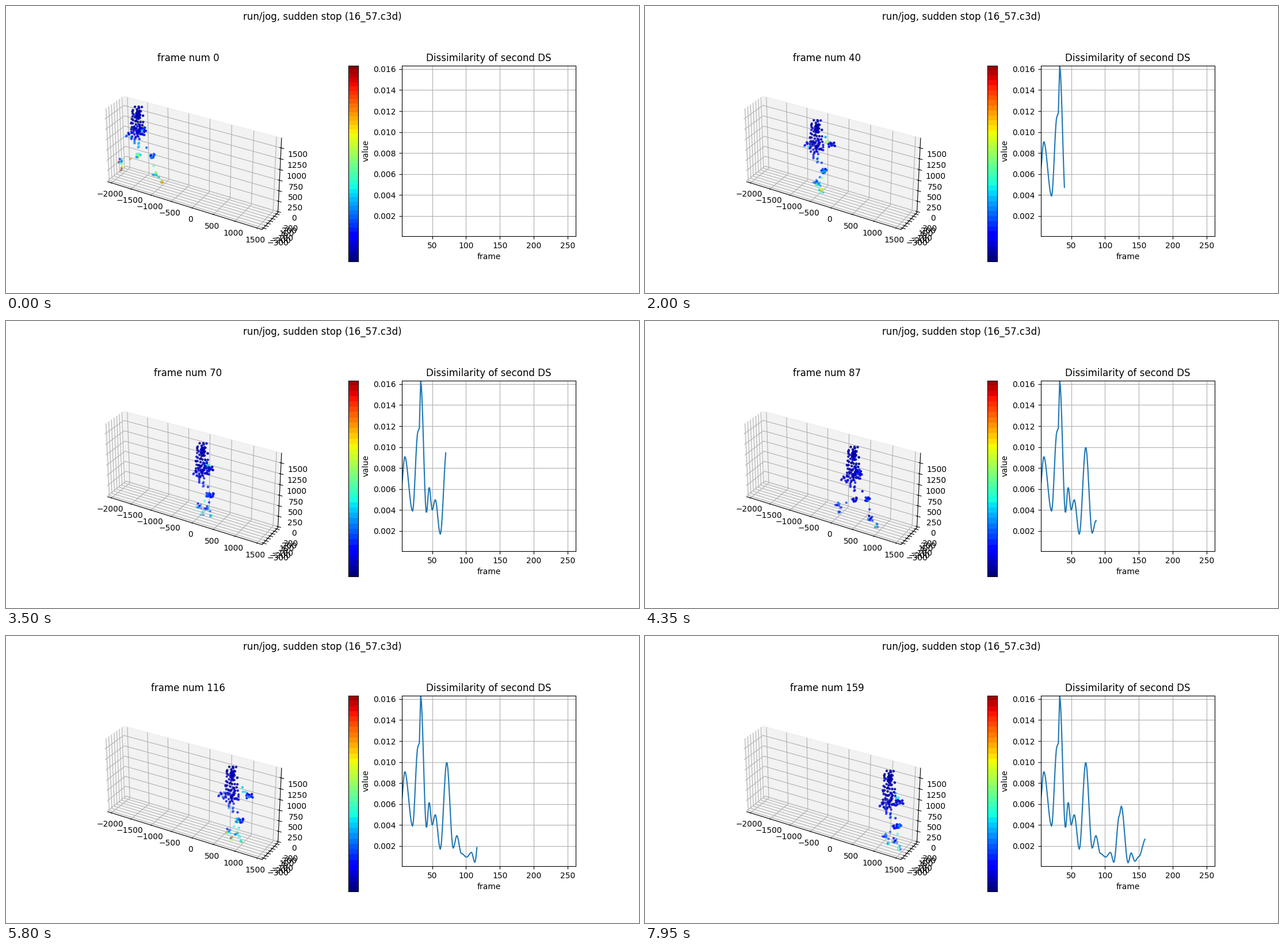
Write a matplotlib script that moves like this. It is 1100 px wide and 500 px high and loops after 8000 ms.

```python
import numpy as np
import matplotlib.pyplot as plt
from matplotlib.animation import FuncAnimation

W, H, DPI = 1100, 500, 100
FRAMES, INTERVAL = 160, 50
STRIDE = 58
JET = plt.get_cmap("jet")
rng = np.random.default_rng(16)

# Marker count, spread in pixels (x, y) and colour level of each body part.
PARTS = {
    "top": (1, 0, 0, 0), "head": (27, 4.5, 6.5, 0), "chest": (24, 6.5, 7, 0),
    "belly": (14, 6.5, 6, 0), "hips": (24, 7, 5, .02), "thigh": (8, 3.5, 5, .15),
    "elbow": (3, 4, 3, .3), "hand_r": (11, 4, 3, .1), "hand_l": (10, 4, 4, .1),
    "knee_r": (11, 2.5, 3.5, .35), "knee_l": (11, 2.5, 3.5, .15),
    "shin_r": (1, 0, 0, .5), "shin_l": (1, 0, 0, .2), "upper_leg": (1, 0, 0, .08),
    "ankle_r": (9, 3.5, 3, .25), "ankle_l": (9, 3.5, 3, .3),
    "toe_r": (5, 3, 2, .6), "toe_l": (5, 3, 2, .6),
}

# Turning points of the dissimilarity curve, values in 1e-4.
TURNS = [(4, 60), (9.5, 91), (21, 39), (29, 115), (31, 118), (33, 163), (41.5, 37), (45.5, 62),
         (50, 40), (54.5, 50), (62, 17), (71.5, 100), (81, 18), (86.5, 30), (93, 13), (101, 9.5),
         (108, 14), (113, 4.5), (121, 49), (124, 58), (134, 4), (138.5, 13.5), (144, 5.5),
         (150, 10), (160, 27)]


def smooth(s):
    s = np.clip(s, 0, 1)
    return s * s * (3 - 2 * s)


def eased(t, points):
    """Smooth steps from each turning point to the next."""
    x, y = np.array(points, float).T
    i = np.clip(np.searchsorted(x, t, side="right") - 1, 0, len(x) - 2)
    return y[i] + (y[i + 1] - y[i]) * smooth((t - x[i]) / (x[i + 1] - x[i]))


def mix(a, b, s):
    return a * (1 - s) + b * s


def pose(t):
    """Screen position of every body part: a run that slows down to a stop."""
    hips = np.array([229 + 1.9 * t - .0042 * t**2, 222 + .73 * t - .0018 * t**2])
    head = hips + (-2, -36 - .07 * t)
    p = {"hips": hips, "head": head, "top": head + (9, -10), "thigh": hips + (0, 17),
         "chest": mix(head, hips, .45), "belly": mix(head, hips, .75)}

    stop = smooth((t - 95) / 30)
    arm = 2 * np.pi * t / 84
    p["hand_r"] = hips + (17 - 9 * np.cos(arm) + 8 * stop, -8 + 4 * stop)
    p["hand_l"] = hips + (-14 - 5 * np.sin(arm), -2 + 5 * np.cos(arm))
    p["elbow"] = mix(p["chest"], p["hand_r"], .65) - (0, 4)

    reach = 18 + 11 * np.cos(2 * np.pi * t / 87)
    swing = reach * np.cos(2 * np.pi * t / STRIDE) - 8 * stop
    for side, s in (("r", -swing), ("l", swing)):
        knee = hips + (13 + .4 * s, 40)
        ankle = hips + (2 + s, 61 + .4 * s)
        p["knee_" + side], p["ankle_" + side] = knee, ankle
        p["shin_" + side] = mix(knee, ankle, .5)
        p["toe_" + side] = ankle + (7 + .15 * s, 12)
    lead = max(p["knee_r"], p["knee_l"], key=lambda k: k[0])
    p["upper_leg"] = mix(hips, lead, .62)
    return p


NAMES = [name for name, part in PARTS.items() for _ in range(part[0])]
TRAITS = np.array([PARTS[name][1:] for name in NAMES])
COUNT = len(NAMES)
OFFSET = np.clip(rng.normal(size=(COUNT, 2)), -1.6, 1.6) * TRAITS[:, :2]
DEPTH = rng.normal(0, 9, COUNT)
GAIN = np.exp(rng.normal(0, .4, COUNT))
PHASE = rng.uniform(0, 2 * np.pi, COUNT)


def markers(t):
    """Positions and colours of all markers, far ones first and fainter."""
    p = pose(t)
    xy = np.array([p[name] for name in NAMES]) + OFFSET
    fade = 1 - (t % 90) / 100
    flicker = np.exp(.3 * np.sin(PHASE + .2 * t))
    heat = np.clip((.04 + TRAITS[:, 2] * (.2 + fade)) * GAIN * flicker, 0, 1)
    near = .58 * xy[:, 0] - .5 * xy[:, 1] + DEPTH
    rgba = JET(heat)
    rgba[:, 3] = .3 + .7 * (near - near.min()) / np.ptp(near)
    order = np.argsort(near)
    return xy[order], rgba[order]


def bands(t):
    decay = np.exp(-t / 30)
    return JET(np.linspace(0, .965 + .025 * decay, int(37 + 9 * decay)))[:, None, :]


def rect(x0, y0, x1, y1):
    return [x0 / W, 1 - y1 / H, (x1 - x0) / W, (y1 - y0) / H]


fig = plt.figure(figsize=(W / DPI, H / DPI), dpi=DPI)
fig.suptitle("run/jog, sudden stop (16_57.c3d)")

space = fig.add_axes(rect(146, 103.9, 487, 445), projection="3d")
space.set_xticks(np.arange(-2000, 1501, 500))
space.set_yticks(np.arange(-300, 301, 100))
space.set_zticks(np.arange(0, 1501, 250))
space.set(xlim=(-2097, 1611), ylim=(-362, 362), zlim=(-24, 1721))
space.set_box_aspect((3708, 724, 1745))
space.view_init(elev=30, azim=-60)
title = space.set_title("frame num 0")

bar = fig.add_axes(rect(595.1, 103.9, 612.1, 445))
ramp = bar.imshow(bands(0), origin="lower", extent=(0, 1, 0, 1), aspect="auto",
                  interpolation="nearest")
bar.set(xticks=[], yticks=[])

plot = fig.add_axes(rect(687.7, 103.88, 990, 400.88))
plot.set(xlim=(5, 262), ylim=(.00009, .01633), xlabel="frame", ylabel="value",
         title="Dissimilarity of second DS")
plot.set_xticks(range(50, 251, 50))
plot.set_yticks(np.arange(.002, .017, .002))
plot.grid(True)
line, = plot.plot([], [])
steps = np.arange(5, FRAMES)
curve = eased(steps, TURNS) * 1e-4

stage = fig.add_axes([0, 0, 1, 1], zorder=5)
stage.set(xlim=(0, W), ylim=(H, 0))
stage.set_axis_off()
dots = stage.scatter(*markers(0)[0].T, s=3.2, edgecolors="face", linewidths=1.5)


def update(t):
    xy, rgba = markers(t)
    dots.set_offsets(xy)
    dots.set_facecolor(rgba)
    ramp.set_data(bands(t))
    title.set_text(f"frame num {t}")
    shown = steps <= t
    line.set_data(steps[shown], curve[shown])
    return dots, ramp, title, line


anim = FuncAnimation(fig, update, frames=FRAMES, init_func=lambda: update(0),
                     interval=INTERVAL, repeat=True, repeat_delay=0)
plt.show()
```
